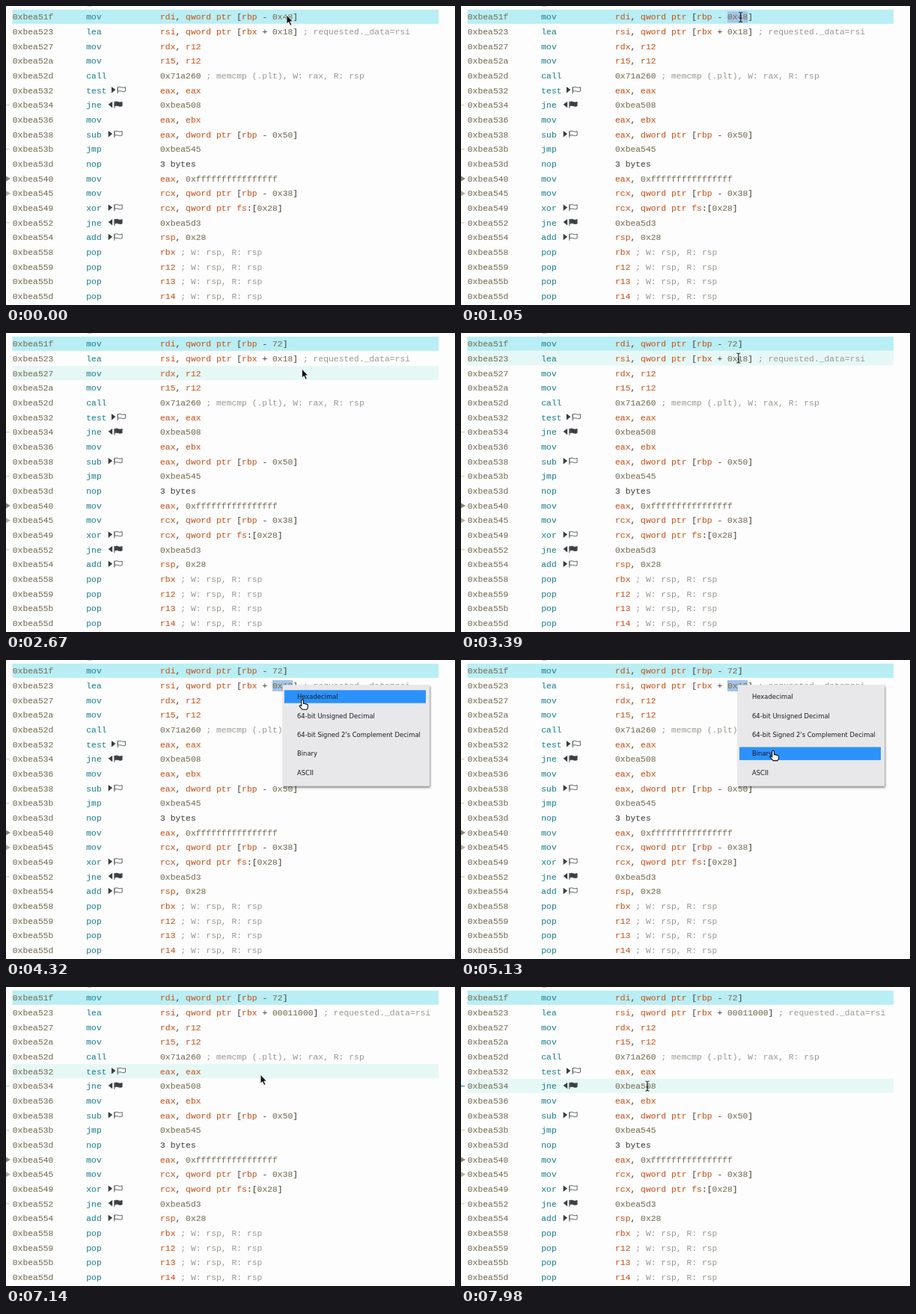
These frames come from a looping animation (600 px wide and 400 px high, 8 s). An HTML page:

```html
<!DOCTYPE html>
<html lang="en">
<head>
<meta charset="utf-8">
<title>Disassembly number formats</title>
<style>
  html, body { margin: 0; width: 100%; height: 100%; overflow: hidden; background: #fdfdfd; }
  svg { display: block; width: 600px; height: 400px; }
  text { white-space: pre; }
  .code { font: 11.36px "Liberation Mono", "Courier New", monospace; stroke-width: .12px; }
  .addr, .num { fill: #7d745c; stroke: #7d745c; }
  .op { fill: #2a8796; stroke: #2a8796; }
  .reg { fill: #c85c28; stroke: #c85c28; }
  .plain { fill: #4c4a44; stroke: #4c4a44; }
  .note { fill: #999890; stroke: none; }
  .menu text { font: 8.43px "DejaVu Sans", Verdana, sans-serif; fill: #1c1c1e; }
  .panel { filter: drop-shadow(1px 2px 1.5px rgba(0, 0, 0, .45)); }
</style>
</head>
<body>
<svg id="stage" viewBox="0 0 600 400"></svg>
<script>
const LOOP = 8000, ROW = 19.66, TOP = 4.8, CHAR = 6.816;
const stage = document.getElementById('stage');

function add(parent, tag, attrs = {}, text) {
  const node = document.createElementNS('http://www.w3.org/2000/svg', tag);
  for (const key in attrs) node.setAttribute(key, attrs[key]);
  if (text !== undefined) node.textContent = text;
  parent.appendChild(node);
  return node;
}
const rect = (parent, x, y, width, height, fill) =>
  add(parent, 'rect', { x, y, width, height, fill });
const show = (node, on) => { node.style.display = on ? '' : 'none'; };
const rowY = i => TOP + i * ROW;

// address, mnemonic, operands, flag use (r = reads, w = writes)
const listing = [
  ['51f', 'mov', ''],
  ['523', 'lea', ''],
  ['527', 'mov', 'rdx, r12'],
  ['52a', 'mov', 'r15, r12'],
  ['52d', 'call', '0x71a260 ; memcmp (.plt), W: rax, R: rsp'],
  ['532', 'test', 'eax, eax', 'w'],
  ['534', 'jne', '0xbea508', 'r'],
  ['536', 'mov', 'eax, ebx'],
  ['538', 'sub', 'eax, dword ptr [rbp - 0x50]', 'w'],
  ['53b', 'jmp', '0xbea545'],
  ['53d', 'nop', '3 bytes'],
  ['540', 'mov', 'eax, 0xffffffffffffffff'],
  ['545', 'mov', 'rcx, qword ptr [rbp - 0x38]'],
  ['549', 'xor', 'rcx, qword ptr fs:[0x28]', 'w'],
  ['552', 'jne', '0xbea5d3', 'r'],
  ['554', 'add', 'rsp, 0x28', 'w'],
  ['558', 'pop', 'rbx ; W: rsp, R: rsp'],
  ['559', 'pop', 'r12 ; W: rsp, R: rsp'],
  ['55b', 'pop', 'r13 ; W: rsp, R: rsp'],
  ['55d', 'pop', 'r14 ; W: rsp, R: rsp']
];

function setOperands(node, source) {
  if (node.dataset.source === source) return;
  node.dataset.source = source;
  node.textContent = '';
  const tokens = source.match(/;.*|0x[0-9a-f]+|\d+(?! bytes)|[a-z]\w*|[^\w;]+|./g);
  for (const token of tokens) {
    const kind = token[0] === ';' ? 'note'
      : source === '3 bytes' ? 'plain'
      : /^\d/.test(token) ? 'num'
      : /^[a-z]/.test(token) ? 'reg' : 'plain';
    add(node, 'tspan', { class: kind }, token);
  }
}

function drawFlag(x, y, kind) {
  const g = add(stage, 'g', { transform: `translate(${x} ${y})` });
  const writes = kind === 'w';
  add(g, 'path', { d: writes ? 'M0 -5L5.5 -1L0 3.5Z' : 'M5.5 -5L0 -1L5.5 3.5Z', fill: '#3a3f42' });
  add(g, 'path', { d: 'M8.2 -5V4', stroke: '#50565a', fill: 'none' });
  add(g, 'path', {
    d: 'M8.5 -4.3Q11.5 -5.6 13.5 -4.2Q15.5 -3.3 18.5 -4.5V1Q15.5 2.2 13.5 1Q11.5 0 8.5 1.2Z',
    fill: writes ? '#fdfdfd' : '#3a3f42', stroke: '#50565a', 'stroke-width': .9
  });
}

const selectedBand = rect(stage, 8.5, rowY(0), 569.5, 19, '#b8eef4');
const hoverBand = rect(stage, 8.5, 0, 569.5, 19, '#e6f8f5');
const tokenBox = rect(stage, 206 + 22 * CHAR, 0, 4 * CHAR, 15, '#a3c4e8');
rect(stage, 109, 0, 5, .8, '#a5c6cc');

const operands = listing.map(([addr, op, args, flag], i) => {
  const y = rowY(i) + 13.5;
  add(stage, 'text', { x: 8.8, y, class: 'code addr' }, '0xbea' + addr);
  add(stage, 'text', { x: 107.3, y, class: 'code op' }, op);
  const node = add(stage, 'text', { x: 206, y, class: 'code' });
  if (args) setOperands(node, args);
  if (flag) drawFlag(op === 'test' ? 141 : 136.7, y - 3.5, flag);
  return node;
});

// Jump markers at the left edge
const dash = i => rect(stage, 0, rowY(i) + 9, 5, 1.6, '#dcdad2');
const tri = (i, fill) => {
  const y = rowY(i) + 10;
  add(stage, 'path', { d: `M0 ${y - 3.5}L6 ${y}L0 ${y + 3.5}Z`, fill });
};
const jumpDash = dash(6);
dash(9);
dash(14);
tri(11, '#868680');
tri(12, '#b0b0aa');

const menu = add(stage, 'g', { class: 'menu' });
add(menu, 'rect', { width: 196, height: 135.5, fill: '#e8e8ea', class: 'panel' });
const menuBar = rect(menu, 2, 0, 189, 17.4, '#2b91fb');
['Hexadecimal', '64-bit Unsigned Decimal', "64-bit Signed 2's Complement Decimal", 'Binary', 'ASCII']
  .forEach((label, i) => add(menu, 'text', { x: 19, y: 19 + 25.4 * i }, label));

// Each pointer is drawn around its hot spot
const pointers = {
  arrow: add(stage, 'path', {
    d: 'M0 0V12L2.7 9.5L4.8 14.2L6.8 13.2L4.8 8.8H8.3Z',
    fill: '#111', stroke: '#fff', 'stroke-width': .8
  }),
  beam: add(stage, 'path', {
    d: 'M-2.5 -6.5Q0 -6.5 0 -5V5Q0 6.5 -2.5 6.5M2.5 -6.5Q0 -6.5 0 -5V5Q0 6.5 2.5 6.5M-1.5 1.5H1.5',
    fill: 'none', stroke: '#222', 'stroke-width': 1.1
  }),
  hand: add(stage, 'path', {
    d: 'M-1.2 8V1Q-1 -.6 .2 -.6Q1.4 -.6 1.5 1V5Q2.8 4 3.8 5.3Q5 4.6 5.8 5.9Q7.4 5.6 7.4 7.5V10L6 12.8H.2L-3.6 8.6Q-4 6.8 -2.3 7Z',
    fill: '#fff', stroke: '#111', 'stroke-width': 1.1, 'stroke-linejoin': 'round'
  })
};

// time, x, y
const path = [
  [0, 375, 12], [500, 375, 12], [750, 373, 15], [1250, 374, 15], [1750, 402, 38],
  [2050, 408, 56.5], [2500, 408, 56.5], [2900, 376, 35], [3150, 371, 33.5], [3950, 370, 33.5],
  [4250, 396, 53.5], [4450, 396, 53.5], [4950, 417, 121.5], [5700, 417, 124],
  [5950, 415, 112], [6900, 415, 112], [7300, 300, 120], [7600, 249, 132.5], [LOOP, 249, 132.5]
];
// time, pointer, menu or selection on row (-1 = none), menu open
const states = [
  [0, 'arrow', -1, false], [600, 'beam', -1, false], [850, 'beam', 0, false],
  [1250, 'arrow', 0, true], [1450, 'hand', 0, true], [2500, 'arrow', -1, false],
  [2850, 'beam', -1, false], [3550, 'beam', 1, false], [3900, 'arrow', 1, true],
  [4080, 'hand', 1, true], [5700, 'arrow', -1, false], [7430, 'beam', -1, false]
];
const menuSpots = [[374, 15.3], [370, 33.3]];

function position(t) {
  const i = Math.max(1, path.findIndex(p => p[0] > t));
  const [t0, x0, y0] = path[i - 1], [t1, x1, y1] = path[i];
  const u = (t - t0) / (t1 - t0), k = u * u * (3 - 2 * u);
  return [x0 + (x1 - x0) * k, y0 + (y1 - y0) * k];
}

function render(t) {
  const [x, y] = position(t);
  const [, pointer, target, open] = states.filter(s => s[0] <= t).pop();
  const hovered = Math.floor((y - TOP) / ROW);

  setOperands(operands[0], `rdi, qword ptr [rbp - ${t < 2500 ? '0x48' : '72'}]`);
  setOperands(operands[1],
    `rsi, qword ptr [rbx + ${t < 5700 ? '0x18' : '00011000'}] ; requested._data=rsi`);

  show(hoverBand, !open && hovered > 0);
  hoverBand.setAttribute('y', rowY(hovered));
  jumpDash.setAttribute('fill', !open && hovered === 6 ? '#4a9fc0' : '#dcdad2');

  show(tokenBox, target >= 0);
  if (target >= 0) tokenBox.setAttribute('y', rowY(target) + 2.5);

  show(menu, open);
  if (open) {
    const [left, top] = menuSpots[target];
    const item = Math.floor((y - top - 3) / 25.4);
    menu.setAttribute('transform', `translate(${left} ${top})`);
    show(menuBar, item >= 0);
    menuBar.setAttribute('y', 7 + 25.4 * item);
  }

  for (const name in pointers) show(pointers[name], name === pointer);
  pointers[pointer].setAttribute('transform', `translate(${x} ${y})`);
}

const start = performance.now();
function tick() {
  render((performance.now() - start) % LOOP);
  requestAnimationFrame(tick);
}
tick();
</script>
</body>
</html>
```
